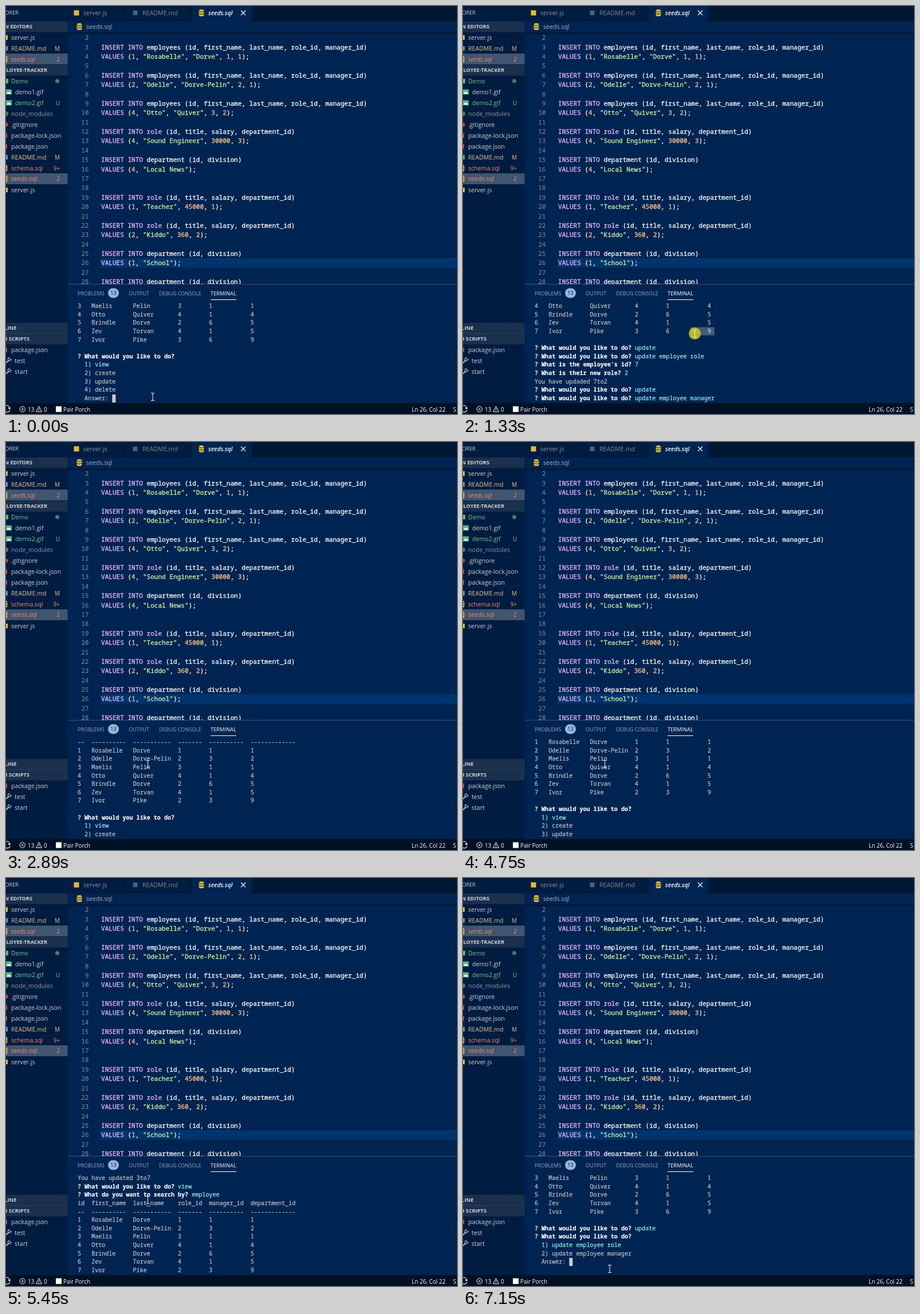
These frames come from a looping animation (787 by 712 pixels, 8 s). An HTML page:

```html
<!DOCTYPE html>
<html lang="en">
<head>
<meta charset="utf-8">
<title>Editor and terminal</title>
<style>
  html, body { margin: 0; width: 100%; height: 100%; overflow: hidden; background: #002451; }
  svg { display: block; width: 787px; height: 712px; }
  text { white-space: pre; font-family: "Open Sans", "Noto Sans", sans-serif; }
  .code, .term text { font-family: "Noto Sans Mono", "DejaVu Sans Mono", monospace; font-weight: 500; }
  .code, .code tspan, .term text, .term tspan { fill: currentColor; stroke: currentColor; }
  .code { font-size: 11px; letter-spacing: .03px; color: #fff; stroke-width: .3px; }
  .line { color: #858b98; stroke-width: 0; }
  .term text { font-size: 10px; letter-spacing: .035px; color: #ccc; stroke-width: .15px; }
  .kw { color: #ebbbff; } .str { color: #d1f1a9; } .num { color: #ffc58f; }
  .term .q { color: #fff; font-weight: 700; }
  .term .mark { color: #d1f1a9; font-weight: 700; }
  .term .cyan { color: #9ff; }
</style>
</head>
<body>
<svg id="stage" viewBox="0 0 787 712" xmlns="http://www.w3.org/2000/svg"></svg>
<script>
const LOOP = 8000;
const ROW = 14.64, COL = 6.035, LEFT = 125, BASE = 527;
const C = {
  editor: '#002451', side: '#001c40', bar: '#001733', status: '#001126',
  header: '#1a304d', picked: '#405570', yellow: '#e2b93d', blue: '#519aba',
  red: '#cc3e44', green: '#73c991', error: '#f48771', changed: '#e2c08d',
  soft: '#ccd2da', dim: '#8c95a5'
};

// ---- drawing helpers ----
const rect = (x, y, w, h, fill, extra = '') =>
  `<rect x="${x}" y="${y}" width="${w}" height="${h}" fill="${fill}" ${extra}/>`;
const dot = (x, y, r, fill) => `<circle cx="${x}" cy="${y}" r="${r}" fill="${fill}"/>`;
const stroke = (d, color, w = 1) =>
  `<path d="${d}" fill="none" stroke="${color}" stroke-width="${w}"/>`;
const label = (x, y, str, fill, size = 10.6, extra = '') =>
  `<text x="${x}" y="${Math.round(y + size * .36)}" fill="${fill}" font-size="${size}" ${extra}>${str}</text>`;
const END = 'text-anchor="end"', BOLD = 'font-weight="700"', ITALIC = 'font-style="italic"';
const span = (cls, str) => `<tspan class="${cls}">${str}</tspan>`;

const database = (x, y, bg) =>
  rect(x - 4.5, y - 6, 9, 12, C.yellow, 'rx="3.5"') +
  stroke(`M${x - 4.5} ${y - 3}q4.5 3 9 0m-9 4q4.5 3 9 0`, bg);
const picture = y =>
  rect(0, y - 4.5, 10, 9, '#4fb88a', 'rx="1"') +
  `<path d="M1 ${y + 3}l3-4 2 2 1-1 2 3z" fill="#fff"/>`;
const wrench = y =>
  stroke(`M0 ${y + 4}l5-5`, C.soft, 1.6) +
  stroke(`M9 ${y - 3}a3 3 0 1 1-3-2.4l-.6 2 1.2 1.2z`, C.soft);

// ---- static interface ----
function sidebar() {
  const square = (y, color, w = 3) => rect(0, y - 4, w, 8, color);
  const file = (x, y, name, color, badge = '', extra = '') =>
    label(x, y, name, color, 10.6, extra) + label(94, y, badge, color, 10, END);
  const title = (x, y, str) => label(x, y, str, C.soft, 9.2, END + ' ' + BOLD);
  const band = (y, h, fill) => rect(0, y, 107.5, h, fill);
  return band(0, 693, C.side) +
    label(22, 12, 'ORER', C.soft, 9.2, END) +
    band(27, 18.5, C.header) + title(46, 36, 'N EDITORS') +
    band(83, 19, C.picked) +
    band(103, 18.5, C.header) + title(72, 112, 'LOYEE-TRACKER') +
    band(292, 19, C.picked) +
    band(553, 37.5, C.header) + band(571, 1, '#2b405c') +
    title(18.5, 562, 'LINE') + title(41, 581, 'M SCRIPTS') +
    square(55, C.yellow) + file(9, 55, 'server.js', C.soft) +
    square(74, C.blue) + file(9, 74, 'README.md', C.changed, 'M') +
    database(-2, 93, C.picked) + file(9, 93, 'seeds.sql', C.error, '2', ITALIC) +
    square(131, '#4fb88a', 4) + file(9, 131, 'Demo', C.green) + dot(89.5, 131, 3.5, '#44806f') +
    picture(150) + file(16, 150, 'demo1.gif', C.soft) +
    picture(169) + file(16, 169, 'demo2.gif', C.green, 'U') +
    dot(0, 188, 4, '#587a56') + file(9, 188, 'node_modules', C.dim) +
    dot(0, 207, 3.5, C.red) + file(9, 207, '.gitignore', C.soft) +
    square(226, C.red, 2) + file(9, 226, 'package-lock.json', C.soft) +
    square(245, C.red, 2) + file(9, 245, 'package.json', C.soft) +
    square(264, C.blue) + file(9, 264, 'README.md', C.changed, 'M') +
    database(-2, 283, C.side) + file(9, 283, 'schema.sql', C.error, '9+') +
    database(-2, 301.5, C.picked) + file(9, 301.5, 'seeds.sql', C.error, '2') +
    square(321, C.yellow) + file(9, 321, 'server.js', C.soft) +
    square(600, C.red, 2) + file(9, 600.5, 'package.json', C.soft) +
    wrench(619) + file(15, 619.5, 'test', C.soft) +
    wrench(638) + file(15, 638, 'start', C.soft);
}

function tabs() {
  return rect(107.5, 0, 679.5, 27, C.bar) +
    rect(107.5, 0, 98.5, 27, C.side) + rect(207, 0, 117, 27, C.side) +
    rect(325, 0, 103.5, 27, C.editor) +
    rect(118.5, 7.5, 9, 9, C.yellow) + label(135, 12.5, 'server.js', C.dim) +
    rect(221.5, 8, 8, 8, '#36688a') + label(238, 12.5, 'README.md', '#808b8c', 10.7) +
    database(341, 12, C.editor) + label(353, 12.5, 'seeds.sql', '#fff', 10.3, ITALIC + ' font-weight="600"') +
    stroke('M410 8l8 8m0-8l-8 8', '#fff', 1.1) +
    database(128, 36, C.editor) + label(140, 36.5, 'seeds.sql', '#a9b4c6');
}

const EMPLOYEES = 'INSERT INTO employees (id, first_name, last_name, role_id, manager_id)';
const ROLE = 'INSERT INTO role (id, title, salary, department_id)';
const DEPT = 'INSERT INTO department (id, division)';
const SOURCE = [
  '', EMPLOYEES, 'VALUES (1, "Rosabelle", "Dorve", 1, 1);',
  '', EMPLOYEES, 'VALUES (2, "Odelle", "Dorve-Pelin", 2, 1);',
  '', EMPLOYEES, 'VALUES (4, "Otto", "Quiver", 3, 2);',
  '', ROLE, 'VALUES (4, "Sound Engineer", 30000, 3);',
  '', DEPT, 'VALUES (4, "Local News");',
  '', '', ROLE, 'VALUES (1, "Teacher", 45000, 1);',
  '', ROLE, 'VALUES (2, "Kiddo", 360, 2);',
  '', DEPT, 'VALUES (1, "School");',
  '', DEPT
];

const paint = line => line.replace(/INSERT INTO|VALUES|\brole\b|"[^"]*"|\b\d+\b/g, word =>
  span(word[0] === '"' ? 'str' : /\d/.test(word) ? 'num' : 'kw', word));

function code() {
  const lines = SOURCE.map((line, i) => {
    const y = Math.round(59.3 + i * 16.38);
    return `<text class="code line" x="144.5" y="${y}" ${END}>${i + 2}</text>` +
      `<text class="code" x="166" y="${y}">${paint(line)}</text>`;
  });
  return rect(165, 440, 622, 16.4, '#00346e') +
    `<g clip-path="url(#codeArea)">${lines.join('')}</g>` +
    rect(108, 46, 679, 5, 'url(#shade)');
}

function panel() {
  return rect(108, 485, 679, 1, '#404f7d') +
    label(125, 501.5, 'PROBLEMS', '#97a5bb', 9) +
    rect(178, 492.5, 19, 17, '#96b6dc', 'rx="8.5"') +
    label(187.5, 501, '13', '#001733', 9, 'text-anchor="middle"') +
    label(214, 501.5, 'OUTPUT', '#97a5bb', 9.1) +
    label(267, 501.5, 'DEBUG CONSOLE', '#97a5bb', 9) +
    label(357, 501.5, 'TERMINAL', '#fff', 9.3) +
    rect(357, 512, 45, 1, '#fff');
}

function statusBar() {
  return rect(0, 693, 787, 19, C.status) +
    stroke('M-3 701a4.5 4.5 0 0 1 9 1m-2-1l2 2 2-2M7 705a4.5 4.5 0 0 1-8 2', '#fff', 1.1) +
    stroke('M24 703.5a4.7 4.7 0 1 0 9.4 0a4.7 4.7 0 1 0-9.4 0m2.7-2l4 4m0-4l-4 4', '#fff') +
    label(38, 704, '13', '#fff', 10) +
    stroke('M57.5 698.5l5 9.5h-10zm0 3.5v3m0 1v1', '#fff') +
    label(66, 704, '0', '#fff', 10) +
    rect(87, 698.5, 10, 10, '#fff') + label(100, 704, 'Pair Porch', '#fff', 9.9) +
    label(708, 704, 'Ln 26, Col 22', '#fff', 9.95) + label(780, 704, 'S', '#fff', 10);
}

// ---- terminal text ----
const ask = (question, answer = '') =>
  span('mark', '? ') + span('q', question + ' ') + span('cyan', answer);
const DO = 'What would you like to do?', ID = "What is the employee's id?";
const cells = list => [4, 12, 13, 9, 12, 13].map((w, i) => String(list[i]).padEnd(w)).join('');
const PEOPLE = [
  ['Rosabelle', 'Dorve', 1, 1, 1], ['Odelle', 'Dorve-Pelin', 2, 3, 2],
  ['Maelis', 'Pelin', 3, 1, 1], ['Otto', 'Quiver', 4, 1, 4],
  ['Brindle', 'Dorve', 2, 6, 5], ['Zev', 'Torvan', 4, 1, 5], ['Ivor', 'Pike', 2, 3, 9]
];
const after = PEOPLE.map((p, i) => cells([i + 1, ...p]));
const before = [...after.slice(2, 6), cells([7, 'Ivor', 'Pike', 3, 6, 9]), ''];
const HEAD = ['id', 'first_name', 'last_name', 'role_id', 'manager_id', 'department_id'];
const RULES = [2, 10, 11, 7, 10, 13].map(n => '-'.repeat(n));

const choices = (names, picked, typed = '') => [
  ...names.map((name, i) => {
    const str = `  ${i + 1}) ${name}`;
    return i + 1 === picked ? span('cyan', str) : str;
  }),
  '  Answer: ' + typed
];
const menu = (picked, typed) =>
  [ask(DO), ...choices(['view', 'create', 'update', 'delete'], picked, typed)];
const UPDATE = ask(DO, 'update');

const history = [
  ...before, UPDATE, ask(DO, 'update employee role'), ask(ID, '7'),
  ask('What is their new role?', '2'), 'You have updaded 7to2',
  UPDATE, ask(DO, 'update employee manager'), ask(ID, '7'),
  ask('Who is their new manager (use manager id)?', '3'), 'You have updated 3to7',
  ask(DO, 'view'), ask('What do you want to search by?', 'employee'),
  cells(HEAD), cells(RULES), ...after, '', ...menu(1)
];

// Each screen: lines plus the column of the block cursor on the last line.
const screens = {
  start: [[...before, ...menu(1)], 10],
  two: [[...before, ...menu(2, '2')], 11],
  three: [[...before, ...menu(3, '3')], 11],
  sent: [[...before, UPDATE, ''], 0],
  sub: [[...before, UPDATE, ask(DO),
    ...choices(['update employee role', 'update employee manager'], 1)], 10],
  history: [history, 10]
};
const rowY = i => Math.round(BASE + i * ROW);
const screen = ([name, [lines, col]]) =>
  `<g id="${name}">` +
  lines.map(l => `<text x="${LEFT}">${l}</text>`).join('') +
  rect(LEFT + col * COL, 0, 6, 14, '#ccc') + '</g>';

document.getElementById('stage').innerHTML =
  `<defs>
    <clipPath id="codeArea"><rect x="108" y="46" width="679" height="439"/></clipPath>
    <clipPath id="termArea"><rect x="108" y="516" width="679" height="176.5"/></clipPath>
    <linearGradient id="shade" x2="0" y2="1">
      <stop stop-color="#000" stop-opacity=".4"/><stop offset="1" stop-opacity="0"/>
    </linearGradient>
  </defs>` +
  rect(0, 0, 787, 712, C.editor) + code() + tabs() + sidebar() + panel() +
  `<g class="term" clip-path="url(#termArea)">
    ${Object.entries(screens).map(screen).join('')}
    ${rect(0, 0, 0, 14.3, '#fff', 'id="selection" fill-opacity=".25"')}
  </g>
  <g id="mouse">
    <circle id="press" r="10.5" fill="#d6c81c" fill-opacity=".85"/>
    ${stroke('M-3 -6.5h2.2l.8 1 .8-1h2.2M0 -5.5v11M-3 6.5h2.2l.8-1 .8 1h2.2', '#e8edf4', 1.1)}
  </g>` + statusBar();

// ---- timeline ----
const steps = [];
// Spread n hard steps over from..to; pairs are [first, last] values.
function run(from, to, n, { top = [1, 1], x, y, press = false, drag = 0, show = 'history' }) {
  for (let i = 0; i < n; i++) {
    const k = n > 1 ? i / (n - 1) : 0;
    const mix = ([a, b]) => a + (b - a) * k;
    steps.push({ at: from + (to - from) * k, top: Math.round(mix(top)),
      x: mix(x), y: mix(y), press, drag, show });
  }
}
const still = v => [v, v];
const rest = { x: still(256), y: still(682), top: still(0) };
const hover = { x: still(247.5), y: still(562), drag: 2 };

run(0, 0, 1, { ...rest, show: 'start' });
run(160, 400, 4, { top: [22, 14], x: still(435), y: still(600) });
run(550, 1090, 8, { top: [11, 1], x: [435, 440], y: [600, 566] });
run(1170, 1170, 1, { x: still(440), y: still(566), press: true });
run(1330, 1470, 3, { x: [404.5, 329], y: [571.5, 566], press: true, drag: 1 });
run(1720, 2490, 11, { x: [318, 124], y: [566, 574], press: true, drag: 1 });
run(2570, 2890, 5, { top: [4, 19], x: [150, 247.5], y: [568, 562], drag: 2 });
run(3820, 3910, 2, { ...hover, top: [20, 22] });
run(4750, 5070, 5, { ...hover, top: [20, 11] });
run(5220, 5300, 2, { ...hover, top: [12, 13] });
run(5450, 5530, 2, { ...hover, top: [15, 19] });
[[5610, 'start'], [5680, 'two'], [6460, 'three'], [7090, 'sent'], [7150, 'sub']]
  .forEach(([at, show]) => run(at, at, 1, { ...rest, show }));

const el = id => document.getElementById(id);
const SELECT_ROW = 4, SELECT_END = 52;

// Rows sit on whole pixels, so each one is placed anew after a scroll.
function placeRows(name, top) {
  const group = el(name), rows = group.querySelectorAll('text');
  rows.forEach((row, i) => row.setAttribute('y', rowY(i - top)));
  group.lastElementChild.setAttribute('y', rowY(rows.length - 1 - top) - 10);
}

function draw(s) {
  for (const name in screens) el(name).style.display = name === s.show ? '' : 'none';
  placeRows(s.show, s.top);
  const col = s.drag === 2 ? 0 : Math.max(0, Math.floor((s.x - 5 - LEFT) / COL));
  const box = el('selection');
  box.setAttribute('x', LEFT + col * COL);
  box.setAttribute('y', rowY(SELECT_ROW - s.top) - 10.5);
  box.setAttribute('width', s.drag && s.show === 'history' ? (SELECT_END - col) * COL : 0);
  el('mouse').setAttribute('transform', `translate(${s.x} ${s.y})`);
  el('press').style.display = s.press ? '' : 'none';
}

let shown;
function tick() {
  const t = performance.now() % LOOP;
  const now = steps.findLast(s => s.at <= t + .5);
  if (now !== shown) draw(shown = now);
  requestAnimationFrame(tick);
}
tick();
</script>
</body>
</html>
```
